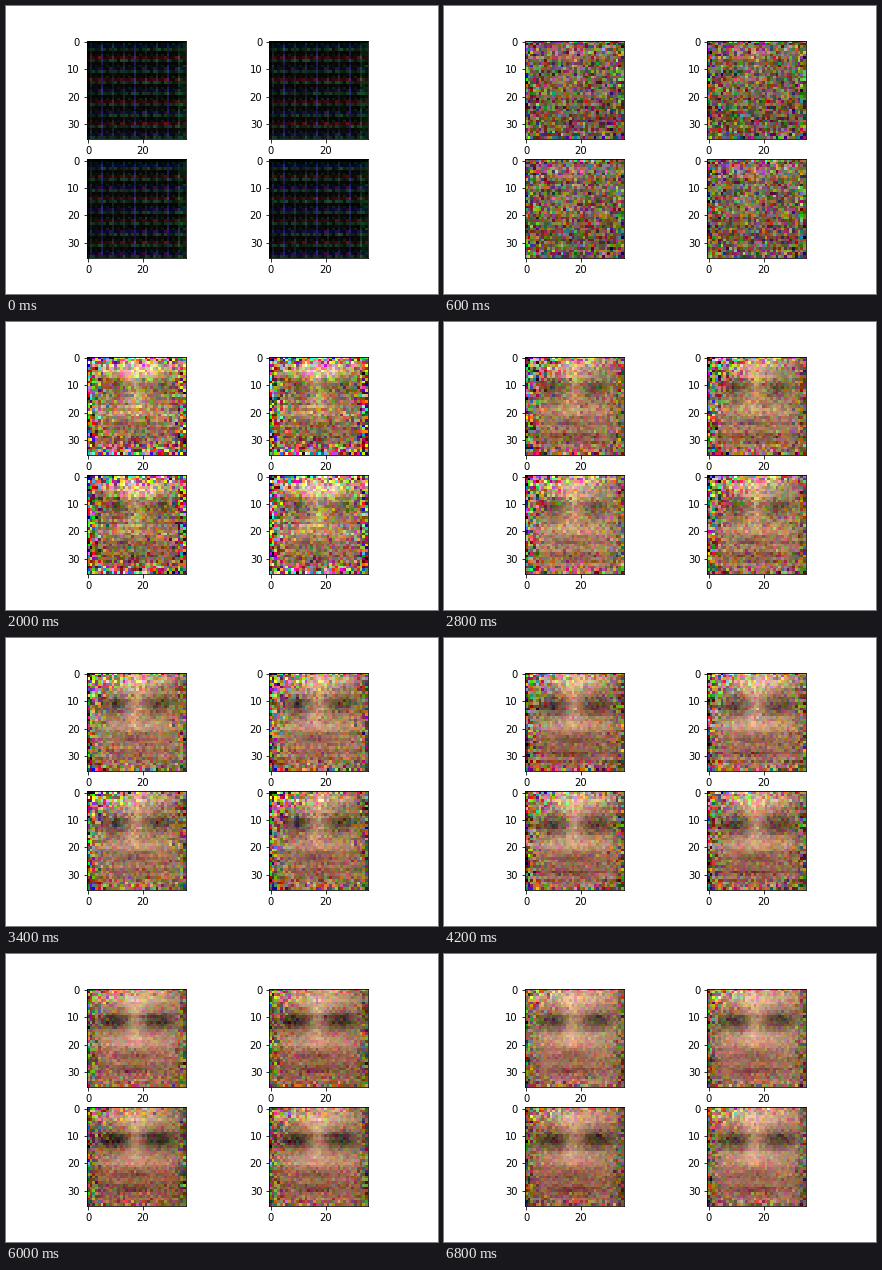
Animation of 432x288 px, one loop 7 s. Source, as a matplotlib script:

```python
import numpy as np
import matplotlib.pyplot as plt
from matplotlib.animation import FuncAnimation

N, STEPS, PANELS = 36, 35, 4
rng = np.random.default_rng(11)
row, col = np.mgrid[0:N, 0:N].astype(float)


def blob(cx, cy, sx, sy):
    """Soft elliptical spot, ready to be multiplied by a colour."""
    d = ((col - cx) / sx) ** 2 + ((row - cy) / sy) ** 2
    return np.exp(-d / 2)[..., None]


def ramp(step, *points):
    """Piecewise linear value through (step, value) points."""
    return np.interp(step, *zip(*points))


def rgb(*values):
    return np.array(values)


border = np.minimum(np.minimum(col, N - 1 - col), np.minimum(row, N - 1 - row))
EDGE = np.exp(-border / 2.2)[..., None]
SIDES = np.exp(-np.minimum(col, N - 1 - col) / 3)[..., None]
CORNER = blob(0, 0, 8, 6) + 0.5 * blob(0, 22, 3, 14)
LOWER = 1 / (1 + np.exp(-(row - 21.5) / 1.2))[..., None]
BROWS = blob(9, 10.5, 5, 3) + blob(26, 10.5, 4.5, 3)
EYES = blob(10, 12, 3.8, 2.4) + blob(25.5, 11.7, 3.8, 2.2)


def grid_pattern():
    """Dark lattice with a period of four cells."""
    lattice = np.full((N, N, 3), 0.035)
    across, down = col.astype(int) % 4, row.astype(int) % 4
    lattice[across == 1] += rgb(0.05, 0.06, 0.08)
    lattice[(across == 1) & (down != 0)] += rgb(0.02, 0.05, 0.03)
    lattice[down == 3] += rgb(0.03, 0.05, 0.04)
    lattice[(down == 3) & (across % 2 == 0)] += rgb(0.01, 0.13, 0.05)
    lattice[row.astype(int) % 8 == 6] += rgb(0.12, 0.0, 0.01)
    lattice[row.astype(int) % 8 == 2] += rgb(0.0, 0.0, 0.14)
    lattice[col.astype(int) % 12 == 5] += rgb(0.02, 0.0, 0.18)
    lattice[(across == 0) & (down == 2)] += rgb(0.16, 0.01, 0.04)
    lattice[(across == 3) & (down == 1)] += rgb(0.0, 0.09, 0.02)
    lattice *= rng.uniform(0.55, 1.25, (N, N, 1))
    lattice[:, 33:] += rgb(0.0, 0.13, 0.02) * rng.random((N, 3, 1))
    lattice[:3] *= rgb(0.3, 1.1, 0.9)
    lattice[0] *= 0.3
    lattice[:, 0] *= 0.3
    return lattice


def face(step, tone):
    """Smooth face that grows clearer with the step."""
    form = ramp(step, (0, 0.15), (6, 0.4), (10, 0.65), (14, 0.75), (21, 1), (34, 1))
    top = ramp(step, (0, 0), (6, 0.16), (10, 0.27), (14, 0.17), (21, 0.15), (34, 0.14))
    warm = ramp(step, (0, 0), (6, 0), (14, 0.6), (21, 0.8), (34, 1))
    skin = rgb(0.64, 0.49, 0.36) * (1 - warm) + rgb(0.68, 0.485, 0.395) * warm
    img = skin + tone + np.zeros((N, N, 3))
    img += top * blob(18, 3.5, 9, 3.6) * rgb(1.1, 1.15, 0.95)
    img -= form * BROWS * rgb(0.17, 0.12, 0.12)
    img -= form * EYES * rgb(0.22, 0.15, 0.12)
    img += form * blob(17, 12, 1.6, 6) * rgb(0.13, 0.12, 0.08)
    img += form * blob(17, 18.5, 11, 2.4) * rgb(0.12, 0.11, 0.10)
    img -= form * LOWER * rgb(0.05, 0.07, 0.06)
    img -= form * blob(17, 24, 5, 1.3) * rgb(0.12, 0.12, 0.09)
    img -= form * blob(17, 29.5, 7, 1.1) * rgb(0.14, 0.14, 0.11)
    img -= form * SIDES * rgb(0.24, 0.11, 0.17)
    return img


def drift(old, keep):
    """Carry part of the old noise on and add fresh noise."""
    return keep * old + np.sqrt(1 - keep ** 2) * rng.normal(size=old.shape)


def noise_level(step):
    inner = ramp(step, (0, 0.03), (3, 0.2), (6, 0.23), (10, 0.115),
                 (14, 0.085), (21, 0.075), (34, 0.06))
    outer = ramp(step, (0, 0), (3, 0.12), (6, 0.2), (10, 0.36),
                 (14, 0.15), (21, 0.14), (34, 0.1))
    corner = ramp(step, (0, 0), (6, 0.1), (10, 0.1), (14, 0.28), (21, 0.16), (34, 0.1))
    return inner + outer * EDGE + corner * CORNER


def build_images():
    lattice = grid_pattern()
    shared = rng.normal(size=(N, N, 3))
    own = rng.normal(size=(PANELS, N, N, 3))
    bands = rng.normal(size=(N, 1, 1))
    images = []
    for step in range(STEPS):
        shared, own, bands = drift(shared, 0.72), drift(own, 0.4), drift(bands, 0.85)
        amount = ramp(step, (0, 0), (1, 0.3), (2, 0.55), (4, 0.9), (6, 1))
        stripe = ramp(step, (0, 0), (6, 0.07), (10, 0.035), (34, 0.02))
        panels = []
        for k in range(PANELS):
            tone = rng.normal(scale=0.018)
            grain = 0.86 * shared + 0.5 * own[k]
            img = face(step, tone) + noise_level(step) * grain + stripe * bands
            start = lattice * (1 + 0.12 * own[k])
            panels.append(np.clip(start * (1 - amount) + img * amount, 0, 1))
        images.append(panels)
    return images


images = build_images()

plt.rcParams.update({"font.family": "DejaVu Sans", "font.size": 10})
fig, axes = plt.subplots(2, 2, figsize=(6, 4), dpi=72)
fig.subplots_adjust(left=0.125, right=0.9, bottom=0.125, top=0.88,
                    wspace=0.2, hspace=0.2)
pictures = []
for ax, img in zip(axes.flat, images[0]):
    pictures.append(ax.imshow(img, interpolation="nearest"))
    ax.set_xticks([0, 20])
    ax.set_yticks([0, 10, 20, 30])


def update(step):
    for picture, img in zip(pictures, images[step]):
        picture.set_data(img)
    return pictures


anim = FuncAnimation(fig, update, frames=STEPS, interval=200,
                     repeat=True, repeat_delay=0, blit=False)
plt.show()
```
